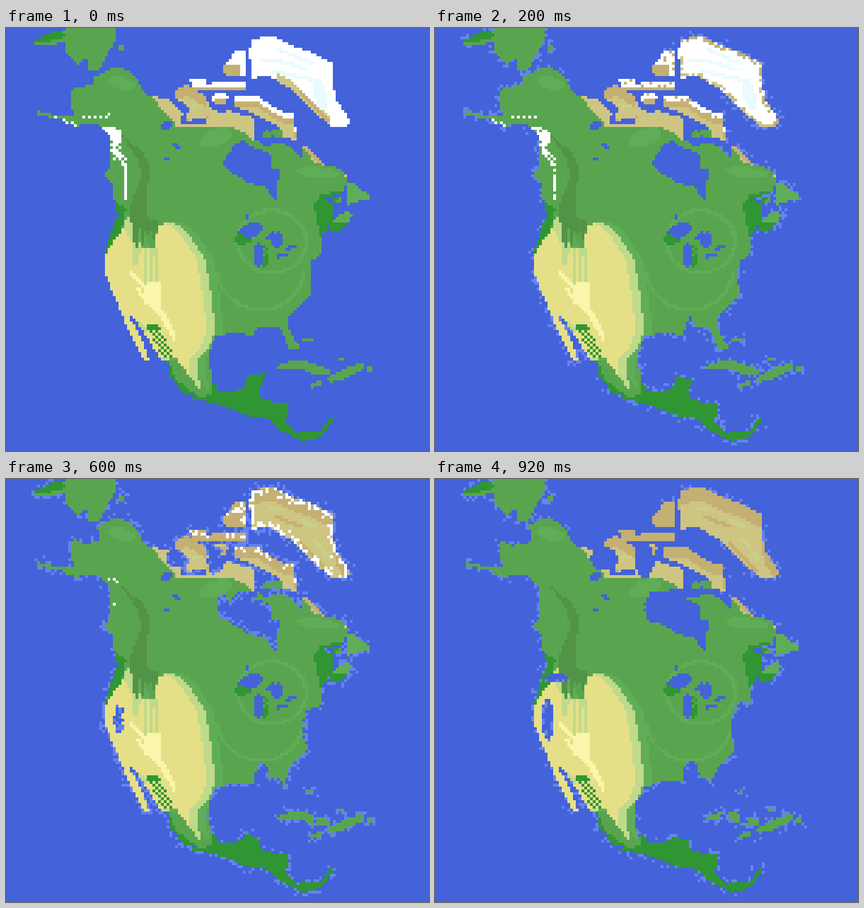
A matplotlib script for the animation above (1000 ms loop, 748x748 px).

```python
import numpy as np
import matplotlib.pyplot as plt
from matplotlib.animation import FuncAnimation
from matplotlib.colors import to_rgb
from matplotlib.path import Path

STAGE, N, FRAMES = 748, 150, 5
CELL = STAGE / N
X, Y = np.meshgrid((np.arange(N) + .5) * CELL, (np.arange(N) + .5) * CELL)
CHECKER = np.indices((N, N)).sum(axis=0) % 2 == 0
ROUGH = np.random.default_rng(7).random((N, N)) - .5

SEA, FOAM = "#4462d9", "#6683ee"
GREEN, LIGHT, DARK, RIDGE = "#59a54f", "#60ad57", "#2f9633", "#529346"
SAND, SUN, PALE = "#e5e087", "#faf5aa", "#bfda8b"
TAN, BROWN, MOSS = "#cfc583", "#c4b073", "#c5d287"
SNOW, FROST = "#ffffff", "#e9fbfe"


# Masks on the cell grid, given in stage pixels
def area(*points):
    path = Path(np.reshape(points, (-1, 2)))
    return path.contains_points(np.column_stack([X.ravel(), Y.ravel()])).reshape(N, N)


def oval(x, y, rx, ry, slope=0):
    dx = X - x
    return (dx / rx) ** 2 + ((Y - y - slope * dx) / ry) ** 2 < 1


def box(x0, y0, x1, y1):
    return (X > x0) & (X < x1) & (Y > y0) & (Y < y1)


def trail(*points):
    mask = np.zeros((N, N), bool)
    corners = np.reshape(points, (-1, 2))
    for a, b in zip(corners, corners[1:]):
        line = a + np.linspace(0, 1, 200)[:, None] * (b - a)
        col, row = np.clip(line / CELL, 0, N - 1).astype(int).T
        mask[row, col] = True
    return mask


def union(*masks):
    return np.logical_or.reduce(masks)


def grow(mask):
    padded = np.pad(mask, 1)
    return union(*(padded[r:r + N, c:c + N] for r in range(3) for c in range(3)))


def depth_of(mask):
    """Count how many cells each place lies inside the edge."""
    depth = np.zeros((N, N), int)
    while mask.any():
        depth += mask
        mask = mask & ~grow(~mask)
    return depth


def upper_edge(mask, rows):
    return mask & ~np.roll(mask, rows, axis=0)


def drips(x0, x1, y, reach, seed):
    lengths = reach * np.random.default_rng(seed).random(N) ** 1.5
    return (X > x0) & (X < x1) & (Y > y) & (Y < y + lengths)


# Coastlines
WEST = area(
    400, 172, 308, 172, 313, 150, 285, 125, 247, 117, 225, 80, 208, 70, 188, 70,
    155, 87, 153, 98, 116, 108, 116, 142, 128, 162, 160, 170, 182, 190, 188, 290,
    198, 330, 175, 392, 176, 435, 203, 500, 228, 512, 274, 587, 286, 587, 290, 615,
    315, 648, 385, 655, 365, 625, 358, 578, 370, 546, 400, 538)
EAST = area(
    399, 170, 440, 198, 465, 212, 468, 205, 493, 205, 525, 232, 523, 211, 535, 211,
    562, 242, 590, 248, 603, 262, 600, 290, 563, 302, 578, 313, 578, 340, 556, 372,
    558, 398, 540, 412, 540, 468, 498, 510, 497, 525, 520, 568, 500, 567, 485, 530,
    442, 530, 437, 543, 399, 538)
ISTHMUS = area(
    340, 640, 408, 642, 425, 632, 427, 615, 458, 610, 448, 645, 452, 658, 500, 665,
    495, 697, 515, 716, 560, 712, 575, 683, 577, 695, 558, 722, 525, 732, 490, 715,
    465, 692, 425, 685, 385, 668, 330, 656)
BAJA = area(203, 500, 215, 506, 237, 543, 254, 588, 245, 588, 219, 540)
SIBERIA = area(45, 27, 65, 14, 88, 5, 130, -2, 195, -2, 195, 20, 176, 50, 163, 77,
               146, 77, 143, 52, 128, 64, 104, 40, 105, 22, 78, 32)
GREENLAND = area(
    430, 45, 433, 23, 462, 14, 480, 17, 510, 33, 538, 42, 577, 62, 577, 98,
    585, 126, 607, 162, 605, 174, 575, 174, 542, 145, 505, 108, 460, 83, 436, 90)
BAFFIN = area(403, 120, 440, 118, 488, 148, 508, 150, 514, 198, 490, 195,
              485, 176, 445, 155, 405, 138)
ELLESMERE = area(384, 70, 404, 42, 424, 42, 424, 87, 388, 82)
PARRY = area(324, 88, 350, 88, 356, 98, 424, 93, 424, 108, 345, 110, 335, 116)
VICTORIA = area(298, 122, 303, 105, 322, 101, 352, 120, 357, 157, 316, 165, 325, 140)
BOOTHIA = area(378, 150, 395, 146, 437, 158, 438, 197, 410, 178, 378, 172)
PRINCE = oval(378, 124, 14, 11)
SHELF = area(355, 128, 362, 142, 380, 150, 388, 174, 355, 173)
NEWFOUNDLAND = area(603, 272, 615, 276, 648, 300, 603, 313)
SCOTIA = oval(592, 343, 19, 13, -.6)
ALEUTIANS = union(trail(57, 149, 85, 157, 105, 160, 125, 172), box(104, 155, 150, 168))
ISLANDS = union(
    oval(507, 597, 30, 7, -.1), oval(550, 605, 24, 9, .2), oval(602, 610, 33, 9, -.4),
    oval(549, 630, 11, 5, -.3), oval(643, 603, 6, 4), oval(533, 551, 10, 4),
    oval(594, 586, 5, 3), oval(180, 259, 4, 10), oval(205, 34, 5, 5),
    oval(586, 304, 8, 5), oval(461, 188, 8, 6), oval(485, 186, 20, 8))

HIGH_ISLES = [ELLESMERE, PARRY, PRINCE, BAFFIN]
ARCTIC = union(*HIGH_ISLES, VICTORIA, BOOTHIA, SHELF)
LAKES = union(
    area(410, 363, 422, 348, 445, 344, 455, 355, 434, 373), oval(446, 401, 8, 23),
    oval(479, 376, 10, 15), trail(460, 372, 472, 364), trail(481, 404, 494, 402),
    oval(503, 388, 11, 4, -.4), oval(427, 335, 3, 5), oval(284, 172, 10, 8, -.3),
    trail(296, 206, 308, 212), trail(280, 232, 289, 232))
HUDSON = area(384, 238, 403, 207, 422, 199, 432, 208, 470, 225, 470, 248, 483, 252,
              478, 307, 456, 280, 432, 275, 393, 253)
BASE = union(WEST, EAST, ISTHMUS, BAJA, SIBERIA, GREENLAND, ARCTIC, NEWFOUNDLAND,
             SCOTIA, ALEUTIANS, ISLANDS) & ~HUDSON & ~LAKES

# Low ground that fills up: centre, final radii, first step
BASINS = [
    (452, 525, 14, 28, 1), (512, 548, 24, 42, 2), (545, 440, 23, 45, 1),
    (445, 608, 32, 30, 1), (386, 228, 15, 28, 2), (425, 205, 32, 9, 3),
    (142, 97, 29, 20, 2), (300, 140, 24, 22, 3), (370, 143, 17, 32, 2),
    (200, 425, 11, 38, 3), (213, 353, 20, 8, 4), (512, 598, 8, 10, 4),
    (546, 602, 6, 14, 3), (364, 595, 10, 35, 3), (415, 543, 32, 9, 3)]

# Terrain, from the widest region to the smallest
PLAINS = area(
    216, 330, 225, 355, 240, 388, 264, 388, 268, 352, 285, 345, 300, 345, 328, 372,
    352, 408, 360, 450, 370, 535, 358, 565, 338, 588, 343, 640, 300, 582, 270, 592,
    240, 597, 160, 420, 205, 358)
RAINFOREST = union(
    area(185, 302, 213, 320, 205, 358, 178, 408, 168, 412, 172, 385, 195, 340),
    area(282, 575, 300, 622, 345, 654, 362, 648, 366, 622, 460, 600, 600, 680,
         600, 748, 270, 748),
    area(45, 27, 65, 14, 88, 5, 108, 9, 103, 17, 60, 27),
    area(602, 286, 556, 295, 544, 315, 554, 367, 566, 367, 580, 340, 580, 308),
    SCOTIA & (Y > 342), oval(418, 374, 15, 9),
    oval(457, 404, 8, 19) & (CHECKER | (Y > 402)))
MOUNTAINS = union(
    area(203, 188, 240, 218, 256, 245, 248, 305, 250, 335, 268, 342, 266, 360,
         222, 352, 220, 315, 238, 265, 236, 238), drips(222, 268, 350, 45, 3))
NORTH = area(236, 100, 300, 125, 365, 135, 440, 155, 440, 200, 410, 177, 375, 171,
             305, 176, 262, 126)
LABRADOR = area(522, 208, 536, 210, 576, 246, 545, 238)
WOODS = union(
    oval(205, 97, 25, 11, .2), oval(552, 256, 38, 10, .1), oval(372, 193, 28, 16, -.3),
    np.roll(PLAINS, 3, axis=1), NEWFOUNDLAND, SCOTIA,
    np.abs(np.hypot((X - 470) / 1.1, Y - 378) - 55) < 3,
    (np.abs(np.hypot(X - 450, Y - 420) - 78) < 3) & (Y > 430))
HATCH = (np.abs(X - 262 - .5 * (Y - 530)) < 11) & (Y > 523) & (Y < 585)
TERRAIN = [
    (LIGHT, WOODS),
    (TAN, union(ARCTIC, GREENLAND, NORTH, LABRADOR, box(597, 252, 605, 266))),
    (BROWN, union(ELLESMERE, PARRY, PRINCE & (Y > 122), upper_edge(BAFFIN, 4),
                  upper_edge(VICTORIA, 4), upper_edge(GREENLAND, 5),
                  upper_edge(LABRADOR, 3), trail(475, 66, 522, 84),
                  trail(520, 112, 572, 164))),
    (MOSS, union(trail(468, 52, 488, 50), trail(522, 72, 545, 85),
                 trail(540, 105, 573, 140), trail(330, 140, 345, 136))),
    (RIDGE, MOUNTAINS),
    (DARK, RAINFOREST),
    (PALE, PLAINS),
    (SAND, PLAINS & np.roll(PLAINS, -3, axis=1)),
    (PALE, drips(225, 268, 388, 80, 5) | trail(235, 520, 248, 535)),
    (RIDGE, drips(222, 268, 350, 45, 3)),
    (SUN, union(area(246, 452, 273, 448, 274, 492, 298, 535, 298, 558, 276, 515,
                     246, 480), trail(220, 432, 250, 462), trail(232, 460, 250, 485))),
    (DARK, HATCH & (CHECKER | (Y < 535)))]

ICE_DEPTH = depth_of(GREENLAND)
FRINGE = GREENLAND & ~np.roll(GREENLAND, -3, axis=0) & (X > 480) & (X < 574)
FROST_STREAKS = union(trail(450, 55, 500, 62, 530, 72), trail(482, 38, 540, 62),
                      trail(470, 75, 545, 92), oval(556, 118, 12, 26, 1))
CAPS = union(ELLESMERE & ((X > 412) | (Y < 66)), PARRY & (Y < 105),
             upper_edge(PRINCE, 2), upper_edge(BAFFIN, 2))
RANGE = trail(178, 180, 196, 188, 193, 212, 210, 245, 213, 300)
SNOWFIELD = union(grow(RANGE) & (Y < 232) & (CHECKER | (Y < 197)), RANGE,
                  trail(80, 157, 122, 170) & CHECKER, trail(132, 157, 188, 154) & CHECKER)
CALM = union(box(240, 40, 505, 312), GREENLAND)


def land_at(step):
    land = BASE.copy()
    for x, y, rx, ry, first in BASINS:
        if step >= first:
            level = (step - first + 1) / (FRAMES - first)
            reach = ((X - x) / rx) ** 2 + ((Y - y) / ry) ** 2
            land &= reach + .3 * ROUGH > level
    return land


def ice_at(step, noise):
    edge = ICE_DEPTH == 1
    sheet = [GREENLAND & ~FRINGE,
             GREENLAND & ~(edge & (noise < .6)),
             GREENLAND & (ICE_DEPTH < 5) & ~(edge & (noise < .5)),
             edge & (noise < .6) | (ICE_DEPTH == 2) & (noise < .15),
             np.zeros_like(edge)][step]
    cover = [1, .85, .6, .3, 0][step]
    return union(sheet, CAPS & (noise < cover), SNOWFIELD & (noise < cover ** 2))


def render(step):
    noise = np.random.default_rng(40 + step).random((N, N))
    image = np.full((N, N, 3), to_rgb(SEA))
    land = land_at(step)
    near = grow(land) & ~land
    far = grow(near) & ~land & ~near
    density = [0, .35, .38, .38, .28][step]
    surf = near & (noise < density) | far & (noise < density / 6)
    if step in (1, 4):
        surf &= ~CALM
    image[surf & ~grow(LAKES)] = to_rgb(FOAM)
    image[land] = to_rgb(GREEN)
    for color, mask in TERRAIN:
        image[mask & land] = to_rgb(color)
    ice = ice_at(step, noise) & land
    image[ice] = to_rgb(SNOW)
    if step < 2:
        image[ice & GREENLAND & FROST_STREAKS] = to_rgb(FROST)
    return image


views = [render(step) for step in range(FRAMES)]
fig = plt.figure(figsize=(STAGE / 100, STAGE / 100), dpi=100)
ax = fig.add_axes([0, 0, 1, 1])
ax.axis("off")
picture = ax.imshow(views[0], interpolation="nearest", aspect="auto")


def update(step):
    picture.set_data(views[step])
    return picture,


animation = FuncAnimation(fig, update, frames=FRAMES, interval=200, repeat=True)
plt.show()
```
